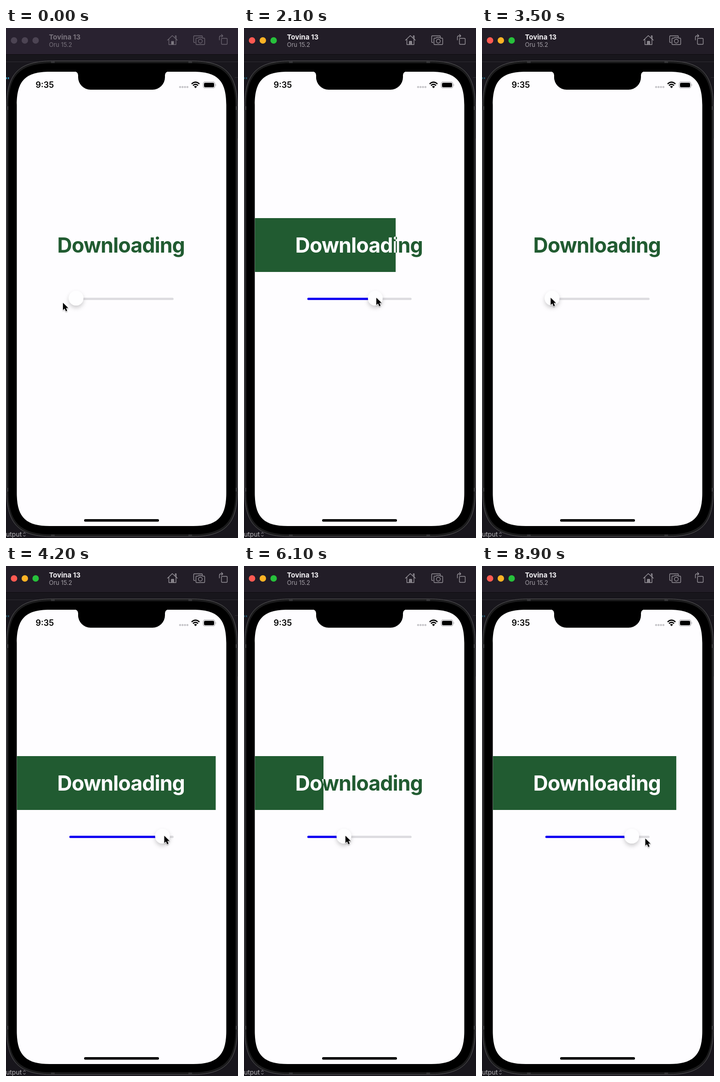
Animation of 505 by 1108 pixels, one loop 9.1 s. Source, as an HTML page:

```html
<!DOCTYPE html>
<html lang="en">
<head>
<meta charset="utf-8">
<title>Download slider</title>
<style>
  html, body { margin: 0; width: 100%; height: 100%; overflow: hidden; background: #18161c; }
  svg { display: block; width: 100%; height: 100%; font-family: Inter, Roboto, sans-serif; }
  .bar { fill: #221d27; }
  .name { font: 700 15px Inter, Roboto, sans-serif; fill: #f3f1f4; }
  .version { font-size: 13px; fill: #a39fa6; }
  .icons { fill: none; stroke: #98949b; stroke-width: 1.4; stroke-linejoin: round; stroke-linecap: round; }
  .code { fill: #24566a; }
  .idle .bar { fill: #292230; }
  .idle .name { fill: #79737d; }
  .idle .version { fill: #79737d; }
  .idle .icons { stroke: #6b6570; }
  .idle .lights circle { fill: #4c4453; }
  .idle .code { fill: #3a9cc0; }
  .label { font: 700 44.8px Inter, Roboto, sans-serif; letter-spacing: -.95px; text-anchor: middle; }
</style>
</head>
<body>
<svg id="stage" viewBox="0 0 505 1108" preserveAspectRatio="none">
  <defs>
    <clipPath id="done"><rect class="fill" x="23.500" y="413" height="117"/></clipPath>
    <filter id="soft" x="-60%" y="-60%" width="220%" height="240%">
      <feDropShadow dx="0" dy="5" stdDeviation="5" flood-opacity=".2"/>
    </filter>
    <filter id="lift" x="-60%" y="-60%" width="220%" height="220%">
      <feDropShadow dx="0" dy="1.5" stdDeviation="1.2" flood-opacity=".35"/>
    </filter>
  </defs>

  <!-- Desktop behind the device -->
  <rect width="505" height="1108" fill="#18161c"/>
  <path d="M0 73.500H505M498 107.500H505" stroke="#302d34"/>
  <path class="code" d="M0 107h2v4h-2zM4 107h2.500v4h-2.500z"/>
  <path d="M0 180V1000M504.500 240V1000" stroke="#2a282d"/>
  <text x="0" y="1105" font-size="14" fill="#bab8bc">utput</text>
  <path d="M37.500 1098.500l2.500-2.500 2.500 2.500M37.500 1102l2.500 2.500 2.500-2.500" fill="none" stroke="#817e84" stroke-width="1.200"/>

  <!-- Title bar -->
  <rect class="bar" width="505" height="57"/>
  <path d="M0 57.500H505" stroke="#0c0a0e"/>
  <g class="lights">
    <circle cx="17.500" cy="27" r="7" fill="#ff5a52"/>
    <circle cx="41" cy="27" r="7" fill="#fdb325"/>
    <circle cx="64.500" cy="27" r="7" fill="#27c13b"/>
  </g>
  <text class="name" x="93.500" y="25">Tovina 13</text>
  <text class="version" x="93.500" y="41">Oru 15.2</text>
  <g class="icons">
    <path d="M351.500 26.500L362 16.500 373 26.500M354.500 24.500V36H370V24.500M368.500 21.500V17H370.500V23.500"/>
    <path d="M360 36V29H365V36" fill="#817d84"/>
    <path d="M411.500 31.500H410Q408.500 31.500 408.500 30V18.500Q408.500 17 410 17H426Q427.500 17 427.500 18.500V20"/>
    <path d="M415 22H418L419.500 20.500H426L427.500 22H431Q432.500 22 432.500 23.500V34.500Q432.500 36 431 36H415Q413.500 36 413.500 34.500V23.500Q413.500 22 415 22Z"/>
    <circle cx="423" cy="28.500" r="4.200"/>
    <rect x="469" y="22.500" width="12.500" height="13" rx="1.500"/>
    <path d="M464.500 26V20.500Q464.500 17 468 17H471.500M469 14L472 17 469 20"/>
  </g>

  <!-- Device -->
  <path id="body" fill="#1b1b1c" stroke="#5c5b5e"/>
  <path d="M98 74.500H106M397 74.500H405M98 1102.500H106M397 1102.500H405M3.500 170V178M501.500 170V178M3.500 999V1007M501.500 999V1007" stroke="#343436" stroke-width="4"/>
  <path id="bezel"/>
  <path id="screen" fill="#fefdff"/>
  <path d="M149 94.500A8 8 0 0 1 157 102.500V107A27 27 0 0 0 184 134H319A27 27 0 0 0 346 107V102.500A8 8 0 0 1 354 94.500Z"/>

  <!-- Status bar -->
  <text x="64.500" y="130.300" font-size="18" font-weight="600">9:35</text>
  <g fill="#c6c5c9">
    <circle cx="379" cy="128.300" r="2.200"/><circle cx="384.300" cy="128.300" r="2.200"/>
    <circle cx="389.600" cy="128.300" r="2.200"/><circle cx="394.900" cy="128.300" r="2.200"/>
  </g>
  <path d="M404 121.500Q412.500 113.700 421 121.500M407 124.900Q412.500 119.900 418 124.900" fill="none" stroke="#000" stroke-width="2.700"/>
  <path d="M409.200 127.300Q412.500 124.600 415.800 127.300L412.500 130.800Z"/>
  <rect x="429.200" y="117.200" width="25.600" height="13.300" rx="4" fill="none" stroke="#a5a4a7" stroke-width="1.200"/>
  <rect x="431" y="119" width="22" height="9.700" rx="2.500"/>
  <path d="M456.300 121.500Q458.600 123.800 456.300 126.200Z" fill="#a5a4a7"/>

  <!-- Label and progress -->
  <text class="label" x="250.300" y="488" fill="#215b31">Downloading</text>
  <g clip-path="url(#done)">
    <rect class="fill" x="23.500" y="413" height="117" fill="#215b31"/>
    <text class="label" x="250.300" y="488" fill="#fefdff">Downloading</text>
  </g>

  <!-- Slider -->
  <rect x="137.800" y="586" width="227" height="5" rx="2.500" fill="#dddce0"/>
  <rect id="track" x="137.800" y="586" height="5" rx="2.500" fill="#1300f2"/>
  <circle id="knob" cy="587" r="16" fill="#fefeff" filter="url(#soft)"/>
  <rect x="170" y="1067" width="163" height="5.600" rx="2.800"/>

  <path id="cursor" d="M0 0V15.800L3.700 12.400 6.300 18.500 9.200 17.300 6.600 11.300H11.500Z" transform="translate(124 597)"
    stroke="#fff" stroke-width="1.300" stroke-linejoin="round" paint-order="stroke" filter="url(#lift)"/>
</svg>

<script>
const LOOP = 9100, STEP = 100, GRAB = 500, RELEASE = 8400, LAG = 70;
const $ = id => document.getElementById(id);
const fills = document.querySelectorAll('.fill');

// Rectangle with continuous corners, close to a circle of radius r at the diagonal.
function smoothRect(id, x, y, w, h, r) {
  const a = 1.3 * r, b = .348 * r, c = a - b;
  $(id).setAttribute('d', `M${x + a} ${y}h${w - 2 * a}c${c} 0 ${a} ${b} ${a} ${a}
    v${h - 2 * a}c0 ${c} ${-b} ${a} ${-a} ${a}h${2 * a - w}c${-c} 0 ${-a} ${-b} ${-a} ${-a}
    v${2 * a - h}c0 ${-c} ${b} ${-a} ${a} ${-a}z`);
}
smoothRect('body', 1.5, 71.5, 502, 1033.5, 77);
smoothRect('bezel', 5.5, 76.5, 494, 1023.5, 73);
smoothRect('screen', 23.5, 95, 456, 987, 55.3);

// [time, progress]
const drag = [
  [0, 0], [600, 0], [1000, .12], [1500, .38], [1900, .6], [2100, .673], [2300, .75],
  [2600, .96], [2800, .8], [3100, .3], [3400, 0], [3600, 0], [3900, .45], [4200, .95],
  [4300, 1], [4450, .97], [5000, .602], [5400, .3], [5600, .2], [5800, .21],
  [6100, .328], [6300, .42], [6500, .587], [6900, .587], [7300, .635], [7500, .74],
  [7900, .78], [8300, .876], [LOOP, .876]
];

const mix = (a, b, k) => a + (b - a) * k;
const ease = k => { k = Math.max(0, Math.min(1, k)); return k * k * (3 - 2 * k); };
const knobX = p => 152.5 + 198 * p;

function progress(t) {
  const i = Math.max(1, drag.findIndex(key => key[0] >= t));
  const [t0, a] = drag[i - 1], [t1, b] = drag[i];
  return mix(a, b, (t - t0) / (t1 - t0));
}

// The knob trails the pointer a little while dragged.
function pointer(t) {
  const grip = knobX(progress(Math.min(t + LAG, RELEASE))) - 3;
  const grab = ease((t - 100) / (GRAB - 100)), leave = ease((t - RELEASE) / 500);
  return t < GRAB
    ? [mix(124, grip, grab), mix(597, 586, grab)]
    : [mix(grip, 355.5, leave), mix(586, 592, leave)];
}

function draw(now) {
  const t = Math.floor(now % LOOP / STEP) * STEP;
  const p = progress(t), x = knobX(p);
  $('stage').classList.toggle('idle', t < 400);
  fills.forEach(el => el.setAttribute('width', 456 * p));
  $('track').setAttribute('width', x - 137.8);
  $('knob').setAttribute('cx', x);
  $('cursor').setAttribute('transform', `translate(${pointer(t)})`);
  requestAnimationFrame(draw);
}
requestAnimationFrame(draw);
</script>
</body>
</html>
```
